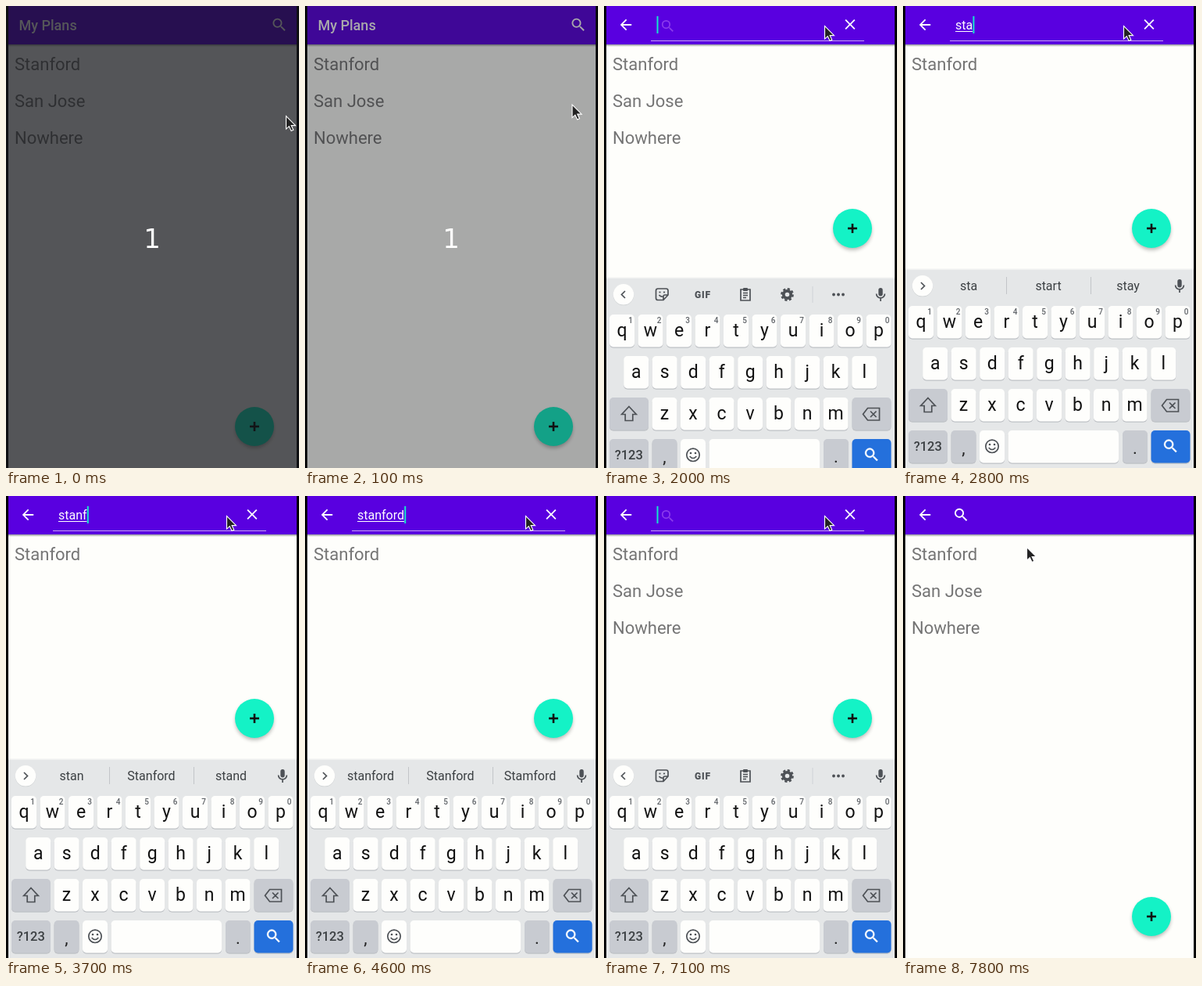
These frames come from a looping animation (375 by 590 pixels, 8000 ms). An HTML page:

```html
<!DOCTYPE html>
<html lang="en">
<head>
<meta charset="utf-8">
<title>List search</title>
<style>
html, body { margin: 0; width: 100%; height: 100%; overflow: hidden; background: #000; }
svg { display: block; width: 375px; height: 590px; font-family: Roboto, sans-serif; }
.mid { text-anchor: middle; }
.line { fill: none; stroke: #4d5156; stroke-width: 1.7; }
</style>
</head>
<body>
<svg id="stage" viewBox="0 0 375 590" xmlns="http://www.w3.org/2000/svg"></svg>
<script>
const LOOP = 8000;
const stage = document.getElementById('stage');

// ---- timelines: [start ms, value...], each holds until the next ----
const cursorTrack = [
  [0, 358.5, 140.5], [100, 342, 126], [200, 322, 108], [400, 314.5, 72.5],
  [600, 331, 40], [700, 339, 23], [900, 339.5, 24.5], [1100, 335.5, 26.5],
  [1300, 318.5, 28], [1500, 309, 27.5], [1600, 297, 27], [1700, 287, 26],
  [1800, 282.5, 25.5], [7200, 307.5, 25], [7600, 286, 32], [7700, 205, 52],
  [7800, 158.5, 65.5]
];
const typedTrack = [
  [0, ''], [2400, 's'], [2600, 'sta'], [3400, 'stan'], [3500, 'stanf'],
  [3900, 'stanfo'], [4300, 'stanford'], [5400, 'stanfor'], [5700, 'stanfo'],
  [5800, 'stanf'], [5900, 'stan'], [6000, 'sta'], [6500, 's'], [6600, '']
];
const composeTrack = [[0, 0], [2400, 1], [2800, 3], [3700, 5], [4000, 6], [4500, 8]];
const hintTrack = [
  [0, ''], [2400, 's so see'], [2800, 'sta start stay'], [3700, 'stan Stanford stand'],
  [4000, 'stanfo Stanford Stanfords'], [4500, 'stanford Stanford Stamford'],
  [5800, 'stanfo Stanford Stanfords'], [5900, 'stan stand Stanford'], [6600, '']
];
const caretTrack = [[0, 0], [1700, 1], [3300, 0], [3400, 1], [6600, 0], [7100, 1], [7600, 0]];
const modeTrack = [[0, 'home'], [900, 'open'], [7600, 'closed']];
const boardTrack = [[0, 260], [2000, 11], [2100, 0], [7600, 120], [7700, 260]];
const dimTrack = [[0, 1], [100, 0.5], [200, 0]];

const at = (track, t) => {
  let found = track[0];
  for (const step of track) if (step[0] <= t) found = step;
  return found;
};

// ---- drawing helpers ----
const text = (x, y, size, fill, s, extra = '') =>
  `<text x="${x}" y="${y}" font-size="${size}" fill="${fill}" ${extra}>${s}</text>`;
const mid = (x, y, size, fill, s, extra = '') => text(x, y, size, fill, s, 'class="mid" ' + extra);
const rect = (x, y, w, h, fill, extra = '') =>
  `<rect x="${x}" y="${y}" width="${w}" height="${h}" fill="${fill}" ${extra}/>`;
const icon = (d, x, y, scale, fill, extra = '') =>
  `<path d="${d}" transform="translate(${x} ${y}) scale(${scale})" fill="${fill}" ${extra}/>`;
const line = (d, extra = '') => `<path class="line" d="${d}" ${extra}/>`;
const dot = (x, y, r, fill) => `<circle cx="${x}" cy="${y}" r="${r}" fill="${fill}"/>`;
const group = (id, body, extra = '') => `<g id="${id}" ${extra}>${body}</g>`;

const LENS = 'M15.5 14h-.79l-.28-.27A6.47 6.47 0 0 0 16 9.5 6.5 6.5 0 1 0 9.5 16c1.61 0 3.09-.59 4.23-1.57l.27.28v.79l5 4.99L20.49 19zm-6 0a4.5 4.5 0 1 1 0-9 4.5 4.5 0 0 1 0 9z';
const BACK = 'M20 11H7.83l5.59-5.59L12 4l-8 8 8 8 1.41-1.41L7.83 13H20z';
const CROSS = 'M19 6.41L17.59 5 12 10.59 6.41 5 5 6.41 10.59 12 5 17.59 6.41 19 12 13.41 17.59 19 19 17.59 13.41 12z';
const INK = '#4d5156', PLAIN = '#fefefc', GREY = '#c8cbd1', BLUE = '#2470dc';

// ---- keyboard ----
const key = (x, y, w, fill) =>
  rect(x, y + 1.2, w, 41.5, '#bfc2c6', 'rx="5"') + rect(x, y, w, 41.5, fill, 'rx="5"');

function letters(row, left, top, digits) {
  return [...row].map((c, i) => {
    const x = left + i * 36.5;
    return key(x, top, 32, PLAIN) + mid(x + 16, top + 28, 23, '#111', c) +
      (digits ? mid(x + 27, top + 10.5, 10, '#5f6368', (i + 1) % 10, 'font-weight="500"') : '');
  }).join('');
}

function tools() {
  const sticker = line('M82 358V352.5a2.5 2.5 0 0 0-2.5-2.5H69a2.5 2.5 0 0 0-2.5 2.5V362a2.5 2.5 0 0 0 2.5 2.5H76zM76 364.5V360a2 2 0 0 1 2-2h4M70.5 358q2 2.6 4.5 2') +
    dot(71.5, 354.5, 1.1, INK) + dot(77, 354.5, 1.1, INK);
  const clip = line('M175 351h12v14h-12zM178 355.5h6M178 358.5h6M178 361.5h4') +
    rect(178, 349, 6, 4, INK, 'rx="1"');
  const gear = '<circle class="line" cx="234.5" cy="357.5" r="4.7" style="stroke-width:3.8"/>' +
    '<circle class="line" cx="234.5" cy="357.5" r="7.2" style="stroke-width:2.4" stroke-dasharray="3.2 2.455"/>';
  return line('M27 353l-4.5 4.5 4.5 4.5') + sticker +
    text(116, 361.5, 12, INK, 'GIF', 'font-weight="900" letter-spacing=".9"') + clip + gear +
    rect(266.5, 347, 1, 21, '#d0d3d5') + [294, 300, 306].map(x => dot(x, 357.5, 1.9, INK)).join('');
}

function hints() {
  return line('M23 353l4.5 4.5-4.5 4.5') + rect(132, 346, 1, 22, '#c2c5c8') + rect(240, 346, 1, 22, '#c2c5c8') +
    [84, 186, 288].map(x => mid(x, 363, 16, '#3c4043', '', 'data-hint')).join('');
}

function keyboard() {
  const mic = rect(351.3, 349, 5.4, 10.5, INK, 'rx="2.7"') + line('M348.6 356.5a5.4 5.4 0 0 0 10.8 0M354 362v4');
  return rect(3, 335.5, 369, 2, '#f1f2f1') + rect(3, 337, 369, 260, '#e5e7e8') +
    dot(25, 358, 13.3, '#cfd2d4') + dot(25, 357.3, 13.2, PLAIN) +
    group('tools', tools()) + group('hints', hints()) + mic +
    letters('qwertyuiop', 7, 383, true) + letters('asdfghjkl', 25.2, 436) + letters('zxcvbnm', 61.5, 489) +
    key(7, 489, 50, GREY) + line('M32 500.5l9.3 10H36.8v8h-9.6v-8h-4.5z') +
    key(317.5, 489, 50, GREY) + line('M337.5 502.5h15v15.5h-15l-6-7.75zM341 506.5l7.5 7.5M348.5 506.5l-7.5 7.5') +
    key(7, 542, 50, GREY) + mid(31.8, 568, 16.5, '#3c4043', '?123', 'font-weight="500"') +
    key(61.5, 542, 32, GREY) + mid(77.5, 572, 22, '#222', ',') +
    key(98, 542, 32, PLAIN) + '<circle class="line" cx="114" cy="562.3" r="8.2"/>' +
    dot(111, 560, 1.3, INK) + dot(117, 560, 1.3, INK) + line('M109.7 564q4.3 5 8.6 0') +
    key(134.5, 542, 141.5, PLAIN) +
    key(281, 542, 32, GREY) + mid(296.8, 572, 22, '#222', '.') +
    key(317.5, 542, 50, BLUE) + icon(LENS, 331.2, 550.8, 0.94, '#fff', 'stroke="#fff" stroke-width=".4"');
}

// ---- scene ----
const places = ['Stanford', 'San Jose', 'Nowhere'];
const back = icon(BACK, 17.2, 13.2, 0.9, '#fff');

stage.innerHTML =
  `<defs>
    <linearGradient id="fade" x2="0" y2="1"><stop stop-color="#8f8f98"/><stop offset="1" stop-color="#fefefb"/></linearGradient>
    <filter id="blur" x="-30%" y="-30%" width="160%" height="160%"><feGaussianBlur stdDeviation="2.6"/></filter>
  </defs>` +
  rect(0, 0, 375, 590, '#000') + rect(3, 0, 369, 590, '#fefefb') +
  rect(3, 49, 369, 3, 'url(#fade)') + rect(3, 0, 369, 49, '#5900e0') +
  group('home', text(16.5, 31, 18, '#fff', 'My Plans', 'font-weight="500"') + icon(LENS, 338.6, 12.9, 0.93, '#fff')) +
  group('open', back + icon(CROSS, 303.8, 12.3, 0.93, '#fff') + rect(60, 44, 273, 1, '#c6a5f3') +
    group('ghost', icon(LENS, 71.3, 15.4, 0.86, '#8b3bec')) +
    text(67, 30, 16, '#fff', '', 'id="typed"') + rect(67, 32, 0, 1, '#fff', 'id="under"') +
    rect(67, 13, 2, 22, '#14e6cd', 'id="caret"')) +
  group('closed', back + icon(LENS, 63.2, 13, 0.93, '#fff')) +
  places.map(p => text(11, 82, 22, '#757575', p, 'data-place')).join('') +
  group('fab', `<circle cx="0" cy="3" r="24.5" fill="#000" opacity=".28" filter="url(#blur)"/>` +
    dot(0, 0, 25, '#14f2c6') + rect(-6, -1.3, 12, 2.6, '#111') + rect(-1.3, -6, 2.6, 12, '#111')) +
  group('board', keyboard()) +
  group('dim', rect(0, 0, 375, 590, '#14161a', 'opacity=".72"') +
    mid(187, 309, 34, '#fff', '1', 'style="font-family:\'DejaVu Sans\',sans-serif"')) +
  group('cursor', '<path d="M0 0V16.6L3.8 13.2 6.6 19 9.3 17.8 6.6 12.1H12z" fill="#222" stroke="#fff" stroke-width="1.1"/>');

const el = id => document.getElementById(id);
const show = (node, on) => node.setAttribute('display', on ? 'inline' : 'none');
const move = (node, x, y) => node.setAttribute('transform', `translate(${x} ${y})`);
const rows = [...stage.querySelectorAll('[data-place]')];
const hintSlots = [...stage.querySelectorAll('[data-hint]')];

function render(t) {
  const [, x, y] = at(cursorTrack, t);
  const typed = at(typedTrack, t)[1];
  const words = at(hintTrack, t)[1];
  const mode = at(modeTrack, t)[1];
  const drop = at(boardTrack, t)[1];
  const dim = at(dimTrack, t)[1];

  move(el('cursor'), x, y);
  for (const m of ['home', 'open', 'closed']) show(el(m), m === mode);

  if (mode === 'open') {
    const field = el('typed');
    field.textContent = typed;
    const marked = Math.min(typed.length, at(composeTrack, t)[1]);
    el('under').setAttribute('width', marked ? field.getSubStringLength(0, marked) : 0);
    el('caret').setAttribute('x', 67.2 + (typed ? field.getComputedTextLength() : 0.3));
    show(el('caret'), at(caretTrack, t)[1]);
    show(el('ghost'), !typed);
  }

  let line = 0;
  for (const row of rows) {
    const match = row.textContent.toLowerCase().includes(typed);
    show(row, match);
    if (match) row.setAttribute('y', 82 + 47 * line++);
  }

  move(el('fab'), 318, t >= 2000 && t < 7600 ? 284 : 537);
  move(el('board'), 0, drop);
  show(el('board'), drop < 260);
  show(el('tools'), !words);
  show(el('hints'), words);
  words.split(' ').forEach((w, i) => { hintSlots[i].textContent = w; });

  show(el('dim'), dim);
  el('dim').setAttribute('opacity', dim);
}

const start = performance.now();
function tick() {
  render((performance.now() - start) % LOOP);
  requestAnimationFrame(tick);
}
tick();
</script>
</body>
</html>
```
